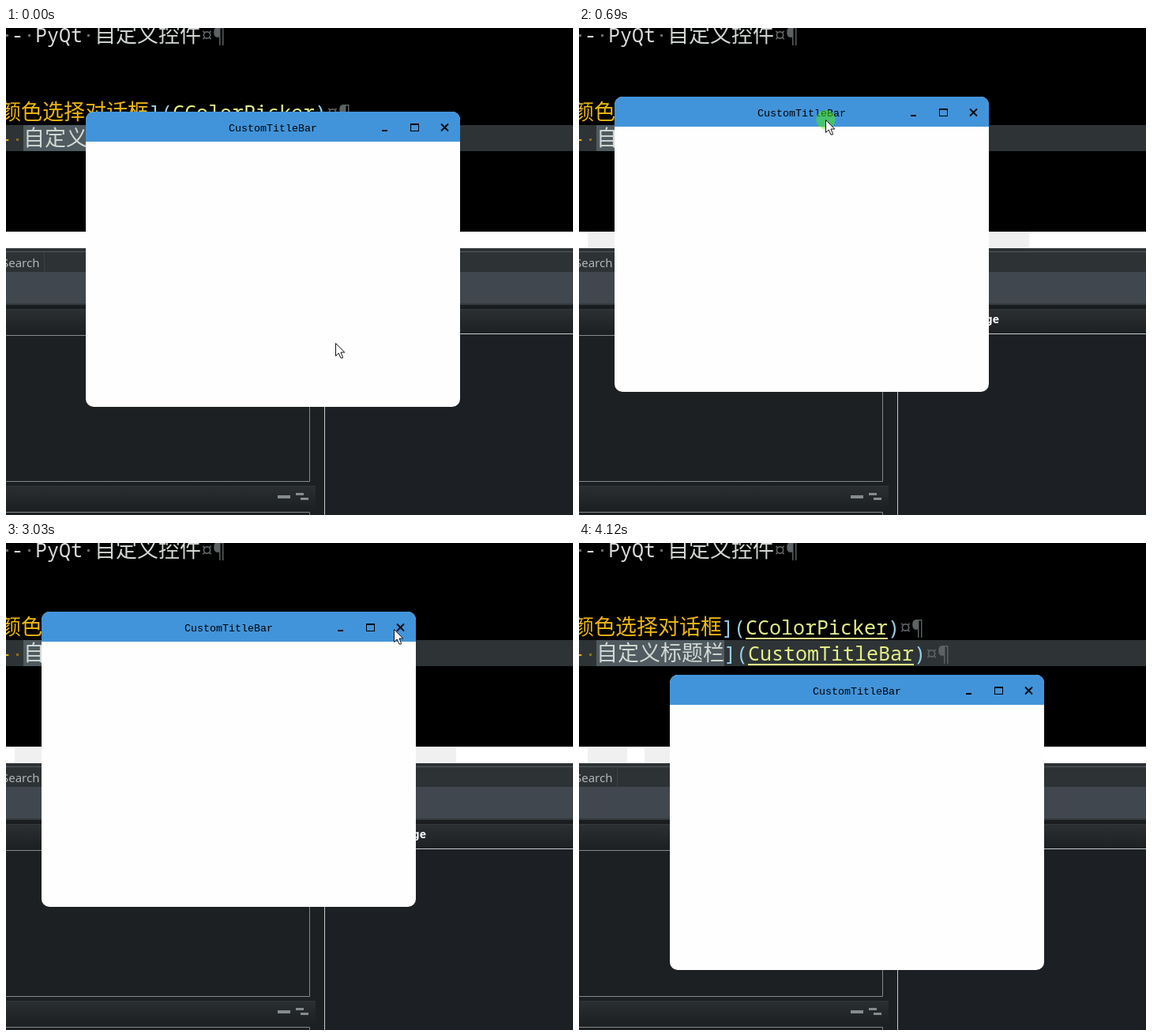
Write an HTML page that moves like this. It is 718 by 617 pixels and loops after 4.45 s.

```html
<!DOCTYPE html>
<html lang="zh">
<head>
<meta charset="utf-8">
<title>CustomTitleBar</title>
<style>
  html, body { margin: 0; width: 100%; height: 100%; overflow: hidden; background: #000; }
  svg { display: block; width: 100vw; height: 100vh; }
  text { white-space: pre; }
  .code { font: 25px "Noto Sans Mono", "DejaVu Sans Mono", monospace; fill: #dcdcdc; }
  .han { font: 300 27px "Noto Sans CJK SC", "Noto Sans CJK", sans-serif; fill: #d2d8d3; }
  .gold { fill: #eeb70e; }
  .link { fill: #e6ee85; }
  .mark { fill: #98cfe6; }
  .dim { fill: #5d6264; }
  .ui { font: 15px "Noto Sans", "Open Sans", sans-serif; fill: #b4b6b7; }
  .bold { font-weight: 700; font-size: 14px; fill: #fff; }
  .title { font: 13.33px "Liberation Mono", monospace; fill: #000; }
  .edge { fill: none; stroke: #85898b; }
</style>
</head>
<body>
<svg viewBox="0 0 718 617" preserveAspectRatio="none">
  <defs>
    <linearGradient id="head" x2="0" y2="1">
      <stop stop-color="#2b2f32"/><stop offset="1" stop-color="#1c2023"/>
    </linearGradient>
    <clipPath id="frame"><rect width="474" height="374" rx="10"/></clipPath>
  </defs>

  <!-- editor -->
  <rect width="718" height="258"/>
  <rect y="123" width="718" height="33" fill="#2e3436"/>
  <rect x="22" y="123" width="162" height="33" fill="#4f5b60"/>
  <g class="code">
    <text x="7" y="18">-</text>
    <text x="37" y="18">PyQt</text>
    <text x="247" y="18" class="dim">¤¶</text>
    <text x="181" y="116"><tspan class="mark">](</tspan><tspan class="link">CColorPicker</tspan><tspan class="mark">)</tspan><tspan class="dim">¤¶</tspan></text>
    <text x="-8" y="149" class="gold">-</text>
    <text x="184" y="149"><tspan class="mark">](</tspan><tspan class="link">CustomTitleBar</tspan><tspan class="mark">)</tspan><tspan class="dim">¤¶</tspan></text>
  </g>
  <path d="M211 121h180M214 154h210" stroke="#e6ee85" stroke-width="2"/>
  <g class="han">
    <text x="112" y="18">自定义控件</text>
    <text x="-8" y="116" class="gold">颜色选择对话框</text>
    <text x="22" y="149">自定义标题栏</text>
  </g>
  <path d="M0 9.5h3m25 0h3m72 0h3" stroke="#666b6c" stroke-width="3"/>
  <rect x="13" y="140" width="3" height="3" fill="#8f7018"/>

  <!-- light strip -->
  <rect y="258" width="718" height="21" fill="#fff"/>
  <g fill="#f0f0f0">
    <rect x="101" y="258" width="469" height="21"/>
    <rect id="trail" x="11" y="258" width="90" height="21"/>
    <rect id="gap" x="61" y="258" width="22" height="21" fill="#fff"/>
  </g>

  <!-- lower panels -->
  <rect y="279" width="718" height="338" fill="#1c2023"/>
  <rect y="279" width="718" height="30" fill="#2d3235"/>
  <path class="edge" d="M0 283.5H718" style="stroke:#54595c"/>
  <path class="edge" d="M48.5 285V309" style="stroke:#3c4144"/>
  <text class="ui" x="-5" y="303">Search</text>
  <rect y="309" width="718" height="40" fill="#41474e"/>
  <rect y="349" width="718" height="2" fill="#33383b"/>
  <rect y="351" width="718" height="5" fill="#1a1d20"/>
  <rect y="356" width="718" height="1" fill="#34393c"/>
  <rect y="357" width="718" height="30" fill="url(#head)"/>
  <text class="ui bold" x="532" y="374" text-anchor="end">Message</text>
  <rect x="403" y="387" width="315" height="230" fill="#1c2024"/>
  <path class="edge" d="M718 387.5H403.5V617" style="stroke:#c8cacb"/>
  <path class="edge" d="M0 389.5H384.5V574.5H0M0 613.5H384.5V617"/>
  <rect y="580" width="392" height="29" fill="url(#head)"/>
  <path class="edge" d="M0 580.5H392" style="stroke:#303538"/>
  <path d="M344 594h16" stroke="#868b8d" stroke-width="4"/>
  <path d="M367 590.5h10m-4 6h10" stroke="#868b8d" stroke-width="3"/>

  <g id="win">
    <g clip-path="url(#frame)">
      <rect width="474" height="374" fill="#fefefe"/>
      <rect width="474" height="38" fill="#4294da"/>
      <rect id="hot" width="38" height="38"/>
    </g>
    <text class="title" x="237" y="25" text-anchor="middle">CustomTitleBar</text>
    <path d="M375 24h7" stroke="#000" stroke-width="2"/>
    <path d="M411 15h11v10h-11zM412 17v7h9v-7z" fill-rule="evenodd"/>
    <path id="cross" d="M450 15.5l9 9m0-9l-9 9" stroke="#000" stroke-width="1.8"/>
  </g>

  <g id="pointer">
    <circle id="press" cx=".5" r="12" fill="#4df300" fill-opacity=".49"/>
    <path d="M.5.5V16.5L4.2 13L6.9 19H9.3V17.6L7 12H11.8Z" fill="#fff" stroke="#111"/>
  </g>
</svg>
<script>
const LOOP = 4450, STEP = 30;
const $ = id => document.getElementById(id);

const linear = p => p;
const easeIn = p => p ** 1.5;
const easeOut = p => p * (2 - p);
const smooth = p => p * p * (3 - 2 * p);

// pointer gestures, each a curve from the previous end point
const home = [417, 399];
const gestures = [
  { start: 0, end: 240, to: [368, 135] },
  { start: 240, end: 420, to: [309, 213], via: [347, 212], ease: easeIn },
  { start: 420, end: 510, to: [278, 149], via: [283, 206], ease: linear },
  { start: 510, end: 660, to: [312, 116], via: [280, 118], ease: easeOut },
  { start: 690, end: 960, to: [425, 116] },
  { start: 1150, end: 1330, to: [419, 110] },
  { start: 1490, end: 1970, to: [457, 107], via: [432, 209] },
  { start: 2220, end: 2670, to: [491, 109], via: [466, 218] },
  { start: 3280, end: 3550, to: [354, 99] },
  { start: 3580, end: 3650, to: [348, 95] },
  { start: 3680, end: 3820, to: [424, 179], via: [386, 144] },
  { start: 3880, end: 4120, to: [405, 625] }
];
// grip is where the pointer holds the window
const drags = [
  { start: 240, end: 660, release: 720, grip: [267, 29] },
  { start: 3580, end: 3820, release: 3880, grip: [309, 12] }
];
const HOVER = '#3a84c2', DOWN = '#3473aa', RED = '#e81123';
const buttons = [
  { x: 360, hover: 1150, press: 1490, leave: 1580, release: 2030, fill: HOVER },
  { x: 398, hover: 2060, press: 2220, leave: 2310, release: 3030, fill: HOVER },
  { x: 436, hover: 3090, leave: 3310, fill: RED }
];
// steps are counted from the moment the pointer sets off again
const wakes = [0, 1150, 1490, 2220, 3280];

const show = (el, on) => { el.style.display = on ? '' : 'none'; };
const move = (el, [x, y]) => el.setAttribute('transform', `translate(${x} ${y})`);

function pointerAt(t) {
  let from = home;
  for (const { start, end, to, via, ease = smooth } of gestures) {
    if (t < start) break;
    if (t < end) {
      const u = ease((t - start) / (end - start)), v = 1 - u;
      return from.map((a, i) => {
        const mid = via ? via[i] : (a + to[i]) / 2;
        return Math.round(v * v * a + 2 * u * v * mid + u * u * to[i]);
      });
    }
    from = to;
  }
  return from;
}

// the window trails the pointer by one step while it is dragged
function windowAt(t) {
  const { start, end, grip } = drags[t < drags[1].start ? 0 : 1];
  const held = pointerAt(Math.min(Math.max(t - STEP, start), end));
  return held.map((v, i) => v - grip[i]);
}

function render(t) {
  const wake = wakes.filter(w => w <= t).pop();
  const tick = t - (t - wake) % STEP;
  move($('pointer'), pointerAt(tick));
  move($('win'), windowAt(tick));
  show($('press'), drags.some(d => t >= d.start && t < d.release)
    || buttons.some(b => t >= b.press && t < b.release));
  show($('trail'), t >= 540);
  show($('gap'), t >= 3790);

  const hot = buttons.find(b => t >= b.hover && t < b.leave);
  show($('hot'), hot);
  if (hot) {
    $('hot').setAttribute('x', hot.x);
    $('hot').setAttribute('fill', t >= hot.press ? DOWN : hot.fill);
  }
  $('cross').setAttribute('stroke', hot && hot.fill === RED ? '#fff' : '#000');
}

const origin = performance.now();
function frame() {
  render((performance.now() - origin) % LOOP);
  requestAnimationFrame(frame);
}
frame();
</script>
</body>
</html>
```
